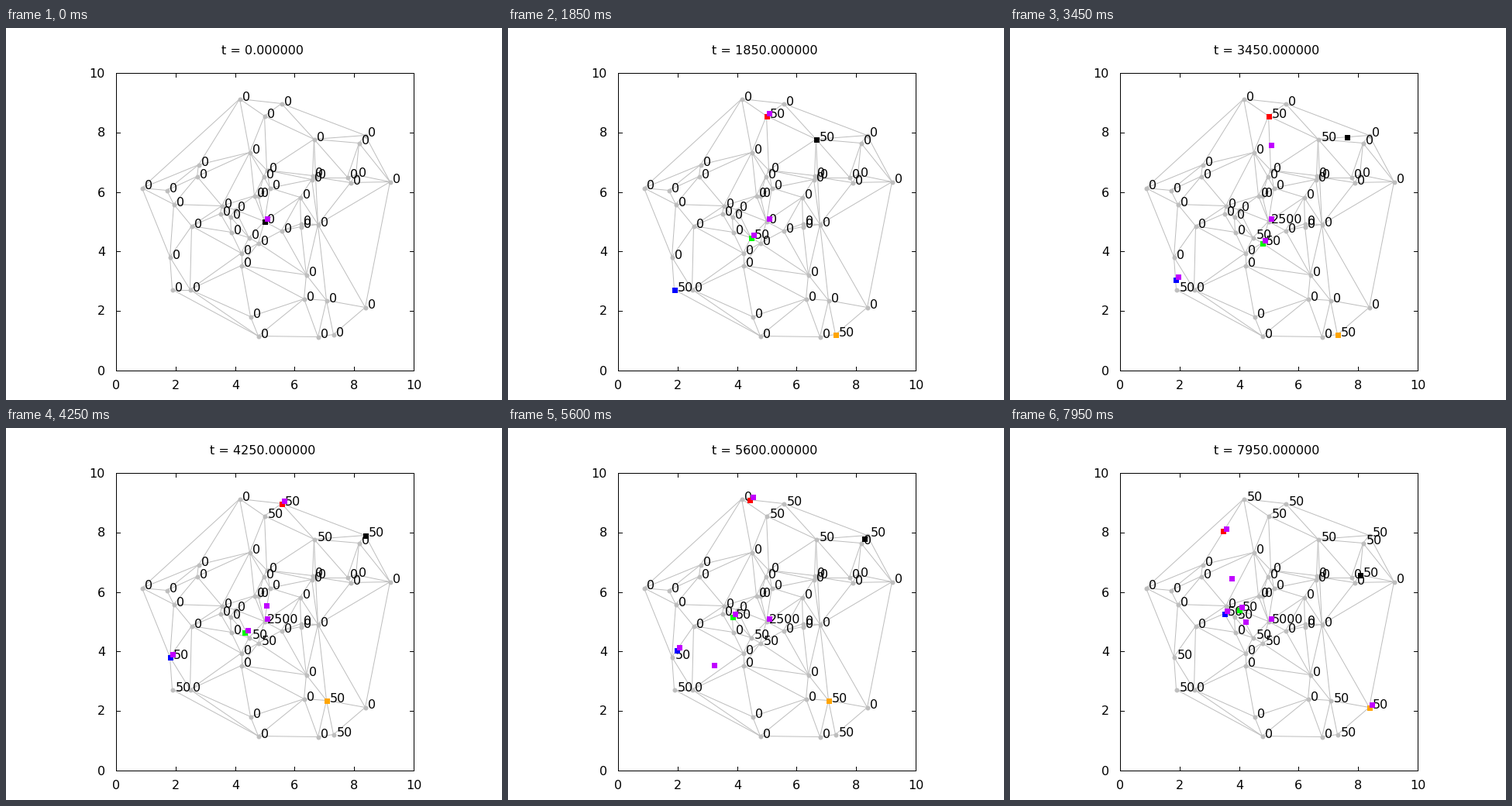
Recreate the animation shown at these times as a matplotlib script. Size 640x480 px, loop 8 s.

```python
import math
import numpy as np
import matplotlib.pyplot as plt
from matplotlib.animation import FuncAnimation
from matplotlib.tri import Triangulation

W, H, DPI = 640, 480, 100
STEP, FRAMES = 50, 160
PT = 72 / DPI          # points per pixel
SPEED = 0.105          # vehicle speed, pixels per ms
OFF = 3.84             # labels and drones sit 0.1 units up and right
GRAY, PURPLE = "#bebebe", "#c000ff"

NODES = {
    "@": (333, 249), "A": (301, 91), "B": (355, 97), "C": (333, 113),
    "D": (397, 143), "E": (463, 138), "F": (455, 148), "G": (314, 160),
    "H": (248, 176), "I": (246, 191), "J": (175, 206), "K": (207, 209),
    "L": (216, 227), "M": (239, 255), "N": (211, 295), "O": (214, 337),
    "P": (237, 337), "Q": (278, 229), "R": (276, 239), "S": (289, 243),
    "T": (295, 234), "U": (290, 263), "V": (313, 270), "W": (325, 277),
    "X": (303, 290), "Y": (303, 306), "Z": (315, 372), "a": (325, 397),
    "b": (402, 398), "c": (422, 395), "d": (384, 349), "e": (413, 351),
    "f": (463, 360), "g": (387, 318), "h": (355, 261), "i": (380, 256),
    "x": (380, 252), "j": (402, 253), "k": (379, 218), "l": (340, 206),
    "m": (336, 183), "n": (332, 191), "o": (320, 216), "p": (325, 216),
    "q": (395, 190), "r": (394, 195), "s": (399, 192), "t": (440, 192),
    "u": (444, 199), "v": (451, 189), "w": (495, 198),
}

# Each leg: departure time and the nodes passed on the way.
VEHICLES = {
    "orange": [(0, "@hgec"), (3600, "ce"), (5650, "ef")],
    "#00ff00": [(0, "@V"), (1900, "VW"), (4040, "WVS"), (6200, "ST")],
    "blue": [(0, "@VXPO"), (3330, "ON"), (5500, "NMR")],
    "red": [(0, "@nmC"), (3850, "CB"), (5185, "BA"), (7480, "AH")],
    "black": [(0, "@krD"), (3090, "DE"), (5540, "EF"), (7500, "Fv")],
}

# Times at which a vehicle carries a drone.
RIDES = [("red", 0, 2030), ("red", 3800, 8000), ("#00ff00", 0, 8000),
         ("blue", 3210, 8000), ("orange", 6790, 8000)]

# Drone flights: (time, node or point).
FLIGHTS = [
    [(1850, "@"), (2600, (248, 273)), (3210, "O")],
    [(2030, "C"), (2600, (327.5, 180)), (2890, "p"), (3180, "@")],
    [(2650, "@"), (3800, "C")],
    [(4100, "@"), (4250, (332, 232)), (4800, "Q"), (5100, (272.7, 257)),
     (5600, (262, 309)), (6400, "@")],
    [(4300, "B"), (5590, "@")],
    [(5620, "@"), (6790, "f")],
    [(6475, "A"), (6800, (295, 129)), (7600, "Q"), (7650, (282, 234)),
     (7950, (300, 253.3))],
    [(7050, "A"), (7950, (282, 197))],
]
DEPOT = [(0, "0"), (2200, "2500"), (6400, "5000")]


def point(p):
    return NODES[p] if isinstance(p, str) else p


def travel(path):
    """Points of a path and the distance covered at each."""
    pts = np.array([NODES[n] for n in path], float)
    gaps = np.hypot(*np.diff(pts, axis=0).T)
    return pts, np.concatenate([[0], np.cumsum(gaps)])


def vehicle_at(color, t):
    start, path = [leg for leg in VEHICLES[color] if leg[0] <= t][-1]
    pts, dist = travel(path)
    done = (t - start) * SPEED
    return np.interp(done, dist, pts[:, 0]), np.interp(done, dist, pts[:, 1])


def flight_at(flight, t):
    times = [stop[0] for stop in flight]
    pts = np.array([point(stop[1]) for stop in flight], float)
    return np.interp(t, times, pts[:, 0]), np.interp(t, times, pts[:, 1])


def drones_at(t):
    spots = [NODES["@"]]
    spots += [vehicle_at(c, t) for c, a, b in RIDES if a <= t <= b]
    spots += [flight_at(f, t) for f in FLIGHTS if f[0][0] <= t <= f[-1][0]]
    return np.array(spots) + (OFF, -OFF)


visits = {path[-1]: start + travel(path)[1][-1] / SPEED
          for legs in VEHICLES.values() for start, path in legs}

plt.rcParams["font.family"] = "DejaVu Sans"
plt.rcParams["font.size"] = 16 * PT
fig = plt.figure(figsize=(W / DPI, H / DPI), dpi=DPI, facecolor="white")
ax = fig.add_axes([0, 0, 1, 1])
ax.set_xlim(-0.5, W - 0.5)
ax.set_ylim(H - 0.5, -0.5)
ax.axis("off")


def line(xs, ys, color="black", z=1):
    ax.plot(xs, ys, color=color, lw=PT, zorder=z)


def squares(color, z):
    return ax.plot([], [], "s", ms=7 * PT, mew=0, color=color, zorder=z)[0]


# Axes box, ticks and tick labels
LEFT, RIGHT, TOP, BOTTOM = 141, 525, 57, 441
line([LEFT, RIGHT, RIGHT, LEFT, LEFT], [TOP, TOP, BOTTOM, BOTTOM, TOP])
for v in range(0, 11, 2):
    x, y = round(LEFT + 38.4 * v), round(BOTTOM - 38.4 * v)
    for edge, d in ((TOP, 5), (BOTTOM, -5)):
        line([x, x], [edge, edge + d])
    for edge, d in ((LEFT, 5), (RIGHT, -5)):
        line([edge, edge + d], [y, y])
    ax.text(x + 0.5, 466, str(v), ha="center", va="baseline")
    ax.text(127.5, y + 6, str(v), ha="right", va="baseline")

# Network
names = list(NODES)
xy = np.array([NODES[n] for n in names], float)
for a, b in Triangulation(xy[:, 0], xy[:, 1]).edges:
    if {names[a], names[b]} != {"J", "O"}:
        line(xy[[a, b], 0], xy[[a, b], 1], GRAY, 2)
ax.plot(xy[:, 0], xy[:, 1], "o", ms=6 * PT, mew=0, color=GRAY, zorder=3)

labels = {n: ax.text(x + OFF, y + 2, "0", va="baseline", zorder=4)
          for n, (x, y) in NODES.items()}
title = ax.text(0, 33, "", va="baseline")
cars = {c: squares(c, 5 + i) for i, c in enumerate(VEHICLES)}
drones = squares(PURPLE, 20)


def draw(frame):
    t = frame * STEP
    title.set_text(f"t = {t:.6f}")
    title.set_x(278 - 5.09 * (len(str(t)) - 1))
    for node, when in visits.items():
        labels[node].set_text("50" if t >= when else "0")
    labels["@"].set_text([s for start, s in DEPOT if start <= t][-1])
    for color, car in cars.items():
        x, y = vehicle_at(color, t)
        car.set_data([x], [y])
    spots = drones_at(t)
    drones.set_data(spots[:, 0], spots[:, 1])
    return [title, drones, *cars.values(), *labels.values()]


anim = FuncAnimation(fig, draw, frames=FRAMES, interval=STEP,
                     repeat=True, repeat_delay=0, blit=False)
plt.show()
```
